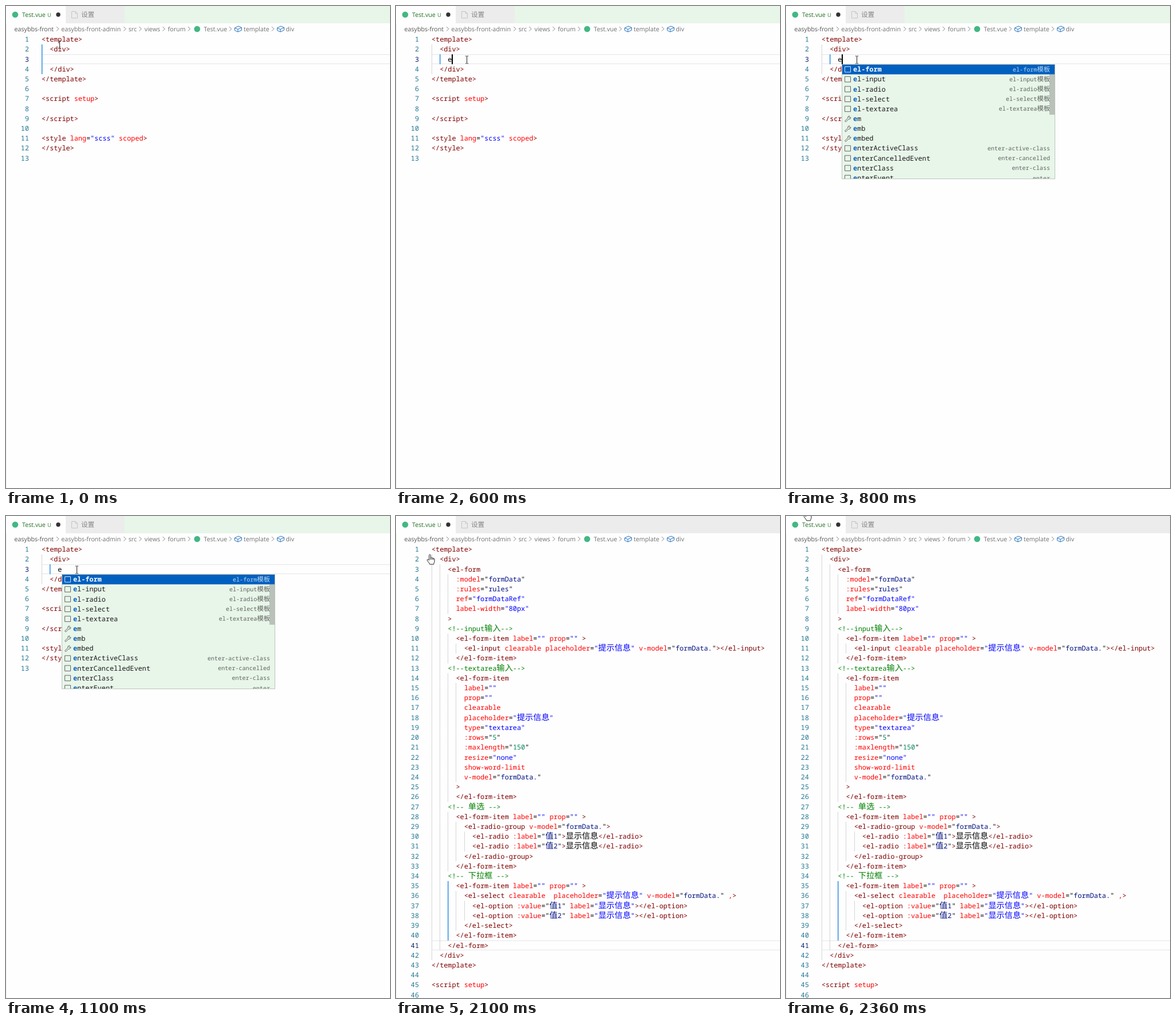
An HTML page that plays this animation: 669x838 px, repeating every 2480 ms.

```html
<!DOCTYPE html>
<html lang="zh">
<head>
<meta charset="utf-8">
<style>
  html, body { margin: 0; width: 100%; height: 100%; overflow: hidden; background: #fefefe; }
  svg { display: block; }
  text { white-space: pre; text-rendering: geometricPrecision; }
  .code { font: 11.8px "Noto Sans Mono", monospace; }
  .code .cjk { font: 14.16px "Noto Sans CJK SC", "Noto Sans CJK", sans-serif; }
  .hint { font: 10.1px "Noto Sans Mono", monospace; }
  .hint .cjk { font: 11.3px "Noto Sans CJK SC", "Noto Sans CJK", sans-serif; }
  .ui { font: 10.7px "Open Sans", "Noto Sans CJK SC", "Noto Sans CJK", sans-serif; }
</style>
</head>
<body>
<svg id="stage" width="669" height="838" viewBox="0 0 669 838"></svg>
<script>
const LOOP = 2480, LEFT = 62, TOP = 49.6, ROW = 17.21, CELL = 7.08;
const stage = document.getElementById('stage');

const rowY = line => TOP + (line - 1) * ROW;
const esc = s => s.replace(/&/g, '&amp;').replace(/</g, '&lt;');
const span = (s, fill, extra = '') => `<tspan fill="${fill}" ${extra}>` +
  esc(s).replace(/[\u4e00-\u9fff]+/g, '<tspan class="cjk">$&</tspan>') + '</tspan>';
const text = (x, y, cls, body, anchor = 'start') =>
  `<text x="${x}" y="${y}" class="${cls}" text-anchor="${anchor}">${body}</text>`;
const rect = (x, y, w, h, fill) =>
  `<rect x="${x}" y="${y}" width="${w}" height="${h}" fill="${fill}"/>`;
const stroke = (x, y, d, color) =>
  `<path transform="translate(${x} ${y})" d="${d}" fill="none" stroke="${color}"/>`;

const before = `<template>
  <div>
MIDDLE
  </div>
</template>

<script setup>

<\/script>

<style lang="scss" scoped>
</style>
`;

const form = `    <el-form
      :model="formData"
      :rules="rules"
      ref="formDataRef"
      label-width="80px"
    >
    <!--input输入-->
      <el-form-item label="" prop="" >
        <el-input clearable placeholder="提示信息" v-model="formData."></el-input>
      </el-form-item>
    <!--textarea输入-->
      <el-form-item
        label=""
        prop=""
        clearable
        placeholder="提示信息"
        type="textarea"
        :rows="5"
        :maxlength="150"
        resize="none"
        show-word-limit
        v-model="formData."
      >
      </el-form-item>
    <!-- 单选 -->
      <el-form-item label="" prop="" >
        <el-radio-group v-model="formData.">
          <el-radio :label="值1">显示信息</el-radio>
          <el-radio :label="值2">显示信息</el-radio>
        </el-radio-group>
      </el-form-item>
    <!-- 下拉框 -->
      <el-form-item label="" prop="" >
        <el-select clearable  placeholder="提示信息" v-model="formData." ,>
          <el-option :value="值1" label="显示信息"></el-option>
          <el-option :value="值2" label="显示信息"></el-option>
        </el-select>
      </el-form-item>
    </el-form>`;

function highlight(line) {
  if (line.trim().startsWith('<!--')) return span(line, '#008000');
  let bound = false;
  return line.replace(/(<\/?[\w-]+|>)|("[^"]*")|([:\w,][\w-]*)|[^<>":\w,]+/g, (s, tag, value, attr) => {
    if (tag) return span(s, '#800000');
    if (attr) {
      bound = /^(:|v-)/.test(s);
      return span(s, s === 'e' ? '#000' : '#ff0000');
    }
    if (!value) return span(s, '#000');
    if (!bound) return span(s, '#0000ff');
    const inner = s.slice(1, -1);
    return span('"', '#000') + span(inner, /^\d+$/.test(inner) ? '#098658' : '#001080') + span('"', '#000');
  });
}

const guide = (level, from, to, color, w = 1) =>
  rect(Math.round(LEFT + level * 2 * CELL), rowY(from), w, (to - from + 1) * ROW, color);

function editor(id, middle, current, active) {
  const lines = before.replace('MIDDLE', middle).split('\n');
  const top = Math.round(rowY(current));
  let out = rect(LEFT, top, 607, 1, '#e6e6e6') + rect(LEFT, top + 16, 607, 1, '#e6e6e6');
  lines.forEach((line, i) => {
    const n = i + 1, y = rowY(n) + 12.5;
    if (rowY(n) > 838) return;
    for (let k = 0; k < line.search(/\S|$/) / 2; k++) out += guide(k, n, n, '#d6d6d6');
    out += text(40, y, 'code', span(String(n), n === current ? '#0b216f' : '#237893'), 'end');
    out += text(LEFT, y, 'code', highlight(line));
  });
  return `<g id="${id}">${out}${guide(...active, '#2288e0', 1.4)}</g>`;
}

function header() {
  const grey = '#707070', dot = (x, y) => `<circle cx="${x}" cy="${y}" r="5.3" fill="#41b883"/>`;
  let out = '<rect id="tabs" width="669" height="30"/>' + rect(0, 0, 104, 30, '#fefefe') + rect(104, 0, 102.5, 30, '#ececec');
  out += rect(0, 30, 1, 808, '#eaf3ee') + dot(16, 15) + dot(333, 40);
  out += text(28, 19, 'ui', span('Test.vue', '#1f701f')) + text(72, 19, 'ui', span('U', '#3a863a', 'font-size="9.5"'));
  out += '<circle cx="91" cy="15" r="3.7" fill="#333"/>';
  out += stroke(114.5, 9.5, 'M0 0H6.5L10 3.5V11.5H0ZM6.5 0V3.5H10', '#c4c4c4');
  out += text(131, 19.3, 'ui', '<tspan fill="#858585" font-size="11.6">设置</tspan>');
  const crumbs = { 14.5: 'easybbs-front', 96.3: 'easybbs-front-admin', 213.5: 'src', 241.3: 'views',
    282: 'forum', 344.5: 'Test.vue', 414: 'template', 487.5: 'div' };
  for (const x in crumbs) out += text(x, 44, 'ui', span(crumbs[x], x === '14.5' ? '#555' : grey));
  for (const x of [88, 205, 232, 273, 317, 389, 463]) out += stroke(x, 36, 'M0 0L3.8 3.8L0 7.6', '#858585');
  for (const x of [398.5, 472.5]) out += stroke(x, 35, 'M0 3.2L6.5 0L12 2.5V7L5.5 10L0 7.5ZM0 3.2L5.5 5.5L12 2.5M5.5 5.5V10', '#2673bd');
  return out;
}

function popup() {
  const items = [['el-form', 'el-form模板'], ['el-input', 'el-input模板'], ['el-radio', 'el-radio模板'],
    ['el-select', 'el-select模板'], ['el-textarea', 'el-textarea模板'], ['em'], ['emb'], ['embed'],
    ['enterActiveClass', 'enter-active-class'], ['enterCancelledEvent', 'enter-cancelled'],
    ['enterClass', 'enter-class'], ['enterEvent', 'enter']];
  let out = rect(0, 0, 372, 200, '#e8f5e9') + rect(0, .5, 372, 17.3, '#0060c0');
  items.forEach(([label, hint], i) => {
    const y = i * 17.16, first = i === 0, icon = first ? '#d4e4f4' : '#666';
    out += hint ? stroke(5.5, y + 4.5, 'M0 0H10V9.5H0Z', icon)
      : stroke(5, y + 4, 'M1 8.5L5.5 4.5C4.8 2 6.5 0 9 .6L7.3 2.5L8.7 4L10.7 2.5C11.3 5 9 6.7 7 6L2.8 10.2C1.5 11 0 9.7 1 8.5Z', icon);
    out += text(20, y + 13.2, 'code',
      span(label[0], first ? '#fff' : '#0060c0', 'font-weight="700"') +
      span(label.slice(1), first ? '#fff' : '#1a1a1a', first ? 'font-weight="600"' : ''));
    if (hint) out += text(363, y + 12.8, 'hint', span(hint, first ? '#c4daf0' : '#5f645f'), 'end');
  });
  return `<svg id="popup" x="97" y="101" width="372" height="200">${out}
    <rect id="slider" x="362" y="18" width="9" height="70" fill="#646464" fill-opacity=".36"/>
    <rect x=".5" y=".5" width="371" height="199" fill="none" stroke="#bcc6bd"/></svg>`;
}

stage.innerHTML = header() +
  editor('blank', '  ', 3, [0, 2, 4]) +
  editor('typed', '    e', 3, [1, 3, 3]) +
  editor('filled', form, 41, [2, 35, 40]) +
  popup() +
  `<rect id="caret" width="2" height="${ROW}" fill="#000"/>
  <path id="beam" d="M-2.5 -6.5H-1L0 -5.7L1 -6.5H2.5M0 -5.7V5.7M-2.5 6.5H-1L0 5.7L1 6.5H2.5" fill="none" stroke="#222"/>
  <path id="hand" d="M4.2 10.5V1.8C4.2 .1 6.8 .1 6.8 1.8V6.3C7.2 5.4 9.2 5.6 9.3 6.8C9.9 6 11.5 6.3 11.6 7.5C12.3 7 13.6 7.4 13.6 8.7V12.3C13.6 14 12.2 15 12.2 17.5H5.3C5 15.5 2.5 13.5 .9 10.6C.2 9.1 1.8 8.3 2.8 9.2ZM6.8 6.3V9.5M9.3 6.8V9.5M11.6 7.5V9.8" fill="#fff" stroke="#222"/>`;

const part = id => document.getElementById(id);
const show = (id, on) => part(id).style.display = on ? '' : 'none';
const move = (id, x, y) => part(id).setAttribute('transform', `translate(${x} ${y})`);

// [time, shape, x, y]
const pointer = [[0, 'beam', 93.5, 67], [80, 'beam', 103.5, 76], [180, 'beam', 115.5, 87], [280, 'beam', 123.5, 93.5],
  [2100, 'hand', 53.5, 66.5], [2220, 'hand', 41.5, 8.5], [2360, 'hand', 30.5, -9.5]];

function draw() {
  const t = performance.now() % LOOP, filled = t >= 1620;
  show('blank', t < 600);
  show('typed', t >= 600 && !filled);
  show('filled', filled);
  show('popup', t >= 710 && !filled);
  part('tabs').style.fill = filled ? '#ececec' : '#e8f5e9';
  part('slider').style.opacity = t < 800 ? .45 : 1;

  show('caret', t >= 180 && t < 1100 || filled && t < 2100);
  if (filled) move('caret', 160.3, rowY(41));
  else move('caret', t < 600 ? 90 : 97, rowY(3));

  const [, shape, x, y] = pointer.filter(p => p[0] <= t).pop();
  show('beam', shape === 'beam');
  show('hand', shape === 'hand');
  move(shape, x, y);
  requestAnimationFrame(draw);
}
draw();
</script>
</body>
</html>
```
